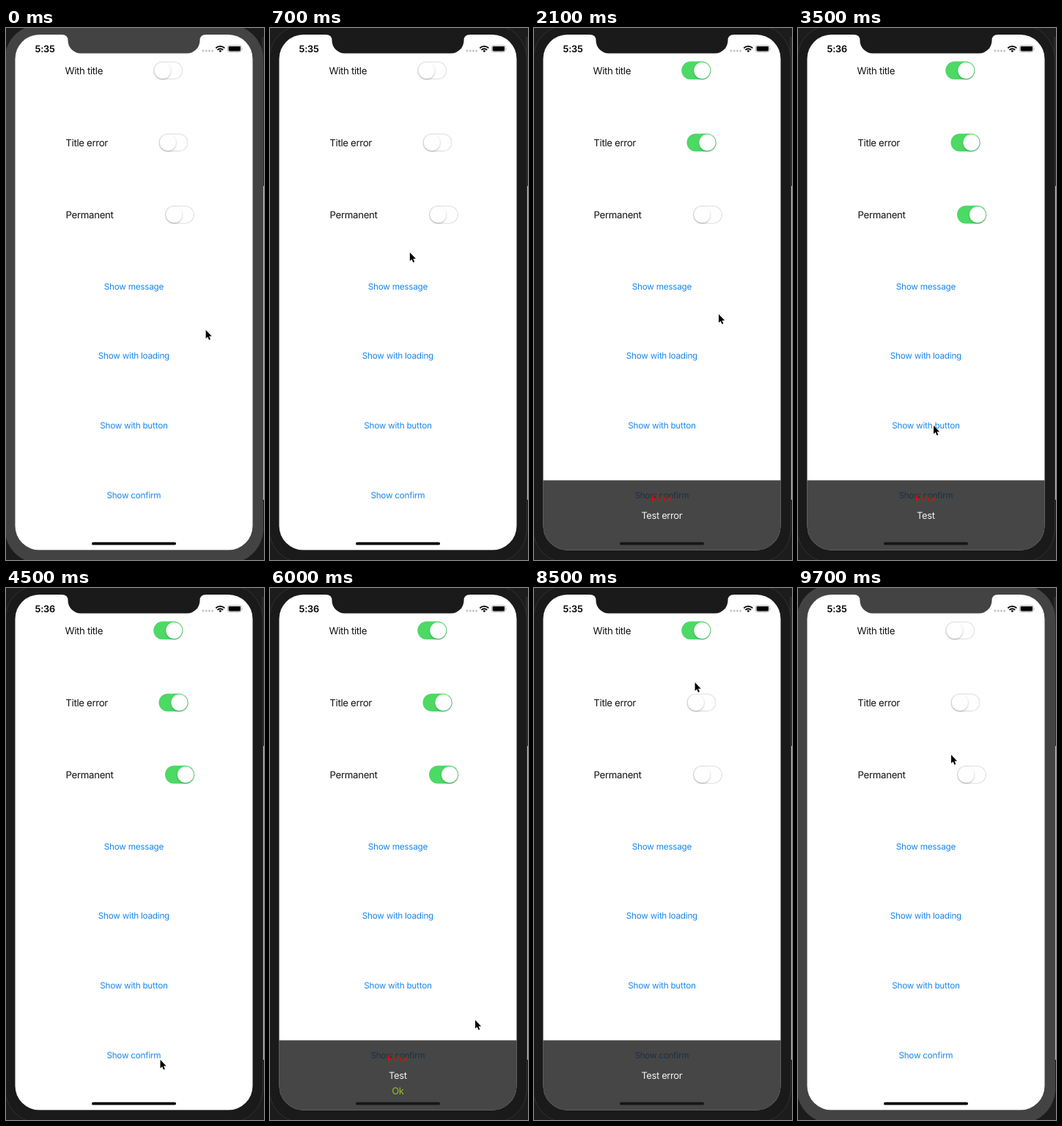
An HTML page for the animation above (9.8 s loop, 352 by 724 pixels).

```html
<!DOCTYPE html>
<html lang="en">
<head>
<meta charset="utf-8">
<title>Toast demo</title>
<style>
html, body { margin: 0; width: 100%; height: 100%; overflow: hidden; background: #222; }
svg { display: block; width: 352px; height: 724px; }
text { font-family: Inter, Roboto, sans-serif; text-rendering: geometricPrecision; }
.label { font-size: 13.26px; letter-spacing: -.335px; fill: #111; }
.button { font-size: 11.7px; letter-spacing: -.22px; fill: #1a86f0; text-anchor: middle; }
.note { font-size: 12.9px; letter-spacing: -.35px; fill: #f4f4f4; text-anchor: middle; }
.clock { font-size: 12.8px; font-weight: 600; letter-spacing: -.2px; }
.bezel { fill: #434343; }
.active .bezel { fill: #1a1a1a; }
.case { stroke: #4a4a4a; stroke-width: .8; }
.active .case { stroke: #363636; }
.track { fill: #fff; stroke: #e4e4e4; stroke-width: 1.3; }
.fill { fill: #4cd964; }
.knob { fill: #fff; filter: drop-shadow(0 1.8px 1.3px rgba(0,0,0,.27)); }
#title { fill: #e80a0a; }
#ok { fill: #93c41e; }
</style>
</head>
<body>
<svg id="stage" viewBox="0 0 352 724">
  <clipPath id="screen"><rect x="12.5" y="9" width="324" height="701.5" rx="33"/></clipPath>

  <rect width="352" height="724" fill="#1c1c1c"/>
  <rect x="349" y="12" width="3" height="203" fill="#2a2a2a"/>
  <rect x="350.5" y="215" width="1.5" height="427" fill="#bdbdbd"/>
  <rect class="bezel case" x="-1" y="-4" width="351.5" height="732" rx="46"/>

  <g clip-path="url(#screen)">
    <rect x="12" y="9" width="325" height="702" fill="#fff"/>
    <path class="bezel" d="M76 8H273V9Q264.500 9 264.500 17A17.500 17.500 0 0 1 247 34.500H102A17.500 17.500 0 0 1 84.500 17Q84.500 9 76 9Z"/>

    <text class="clock" id="clock" x="39.500" y="33">5:35</text>
    <path d="M269 31h13" stroke="#c4c4c4" stroke-width="3" stroke-linecap="round" stroke-dasharray="0 4.2"/>
    <g fill="none" stroke="#000" stroke-width="1.900">
      <path d="M286.300 27.400a8.400 8.400 0 0 1 12 0M288.500 29.800a5.300 5.300 0 0 1 7.600 0"/>
      <path d="M292.300 33.200l-2-2.100a2.900 2.900 0 0 1 4 0z" fill="#000" stroke="none"/>
    </g>
    <rect x="302.600" y="23.800" width="18.400" height="8.800" rx="2.500" fill="none" stroke="#999" stroke-width=".8"/>
    <rect x="303.700" y="24.900" width="16.200" height="6.600" rx="1.400"/>
    <path d="M321.900 26.700q1.500 1.500 0 3z" fill="#999"/>

    <g id="rows"></g>
    <rect x="117" y="699.800" width="115" height="3.800" rx="1.900"/>

    <g id="toast">
      <rect x="12" y="615.500" width="325" height="96" fill="#1c1c1c" fill-opacity=".81"/>
      <text class="note" id="title" x="174" y="645.300">Error</text>
      <text class="note" id="message" x="174.300" y="667.500">Test error</text>
      <text class="note" id="ok" x="174.300" y="688.700">Ok</text>
    </g>
  </g>

  <path id="cursor" d="M0 0V11.600L2.600 9.200 4.500 13.500 6.300 12.700 4.500 8.500H8.100Z" stroke="#fff" stroke-width=".9" stroke-linejoin="round" paint-order="stroke"/>
</svg>
<script>
const $ = id => document.getElementById(id);
const STEP = 100, STEPS = 98;

const options = [['With title', 80.5, 201.3], ['Title error', 81.3, 208.5], ['Permanent', 81.5, 217]];
const actions = ['Show message', 'Show with loading', 'Show with button', 'Show confirm'];
const rowY = i => 57.8 + 98.1 * i;
const buttonY = i => 351.3 + 94.8 * i;

$('rows').innerHTML = options.map(([name, x, left], i) => `
  <text class="label" x="${x}" y="${rowY(i) + 4.7}">${name}</text>
  <g transform="translate(${left} ${rowY(i)})">
    <rect class="track" x=".6" y="-11.6" width="38.8" height="23.2" rx="11.6"/>
    <rect class="fill" y="-12.2" width="40" height="24.4" rx="12.2"/>
    <circle class="knob" r="11.1"/>
  </g>`).join('') + actions.map((name, i) => `
  <text class="button" x="174.4" y="${buttonY(i) + 4.2}">${name}</text>`).join('');
const fills = document.querySelectorAll('.fill');
const knobs = document.querySelectorAll('.knob');

const clamp = p => Math.min(1, Math.max(0, p));
const smooth = p => p * p * (3 - 2 * p);
const ramp = (t, start) => smooth(clamp((t - start) / 200));

// Cursor stops: time, x, y
const onOption = i => [options[i][2] + 21, rowY(i)];
const onButton = i => [185, buttonY(i)];
const stops = [
  [0, 272.6, 411], [100, 209, 227], [600, ...onButton(0)], [1000, ...onOption(0)],
  [1300, 219.6, 128.5], [1700, ...onOption(1)], [2100, 252, 389.5],
  [2400, ...onOption(2)], [3500, ...onButton(2)], [3800, 280, 588],
  [4500, 210.5, 642], [4900, ...onButton(3)]
];

function cursorAt(t) {
  const i = Math.min(stops.findLastIndex(s => s[0] <= t), stops.length - 2);
  const [t0, x0, y0] = stops[i], [t1, x1, y1] = stops[i + 1];
  const p = smooth((t - t0) / (t1 - t0));
  return [x0 + (x1 - x0) * p, y0 + (y1 - y0) * p];
}

// The toast slides in once, then dips away around these moments
const dips = [1700, 2600, 4500];
const toastAt = t => Math.min(ramp(t, 700), ...dips.map(d => ramp(Math.abs(t - d), 100)));

const show = (el, on) => el.setAttribute('visibility', on ? 'visible' : 'hidden');
const move = (el, x, y) => el.setAttribute('transform', `translate(${x} ${y})`);

function draw(t) {
  $('stage').classList.toggle('active', t >= 400);
  $('clock').textContent = t < 3500 ? '5:35' : '5:36';
  options.forEach((_, i) => {
    const p = ramp(t, 1000 + 700 * i);
    fills[i].setAttribute('opacity', p);
    knobs[i].setAttribute('cx', 12.3 + 15.7 * p);
  });
  const up = toastAt(t);
  move($('toast'), 0, 95 * (1 - up));
  $('message').textContent = t < 3200 ? 'Test error' : 'Test';
  show($('title'), t >= 1800);
  show($('ok'), t >= 3600);
  move($('cursor'), ...cursorAt(t));
}

// Plays forward, then backward
function tick() {
  const n = Math.floor(performance.now() / STEP) % STEPS;
  draw(Math.min(n, STEPS - n) * STEP);
  requestAnimationFrame(tick);
}
tick();
</script>
</body>
</html>
```
